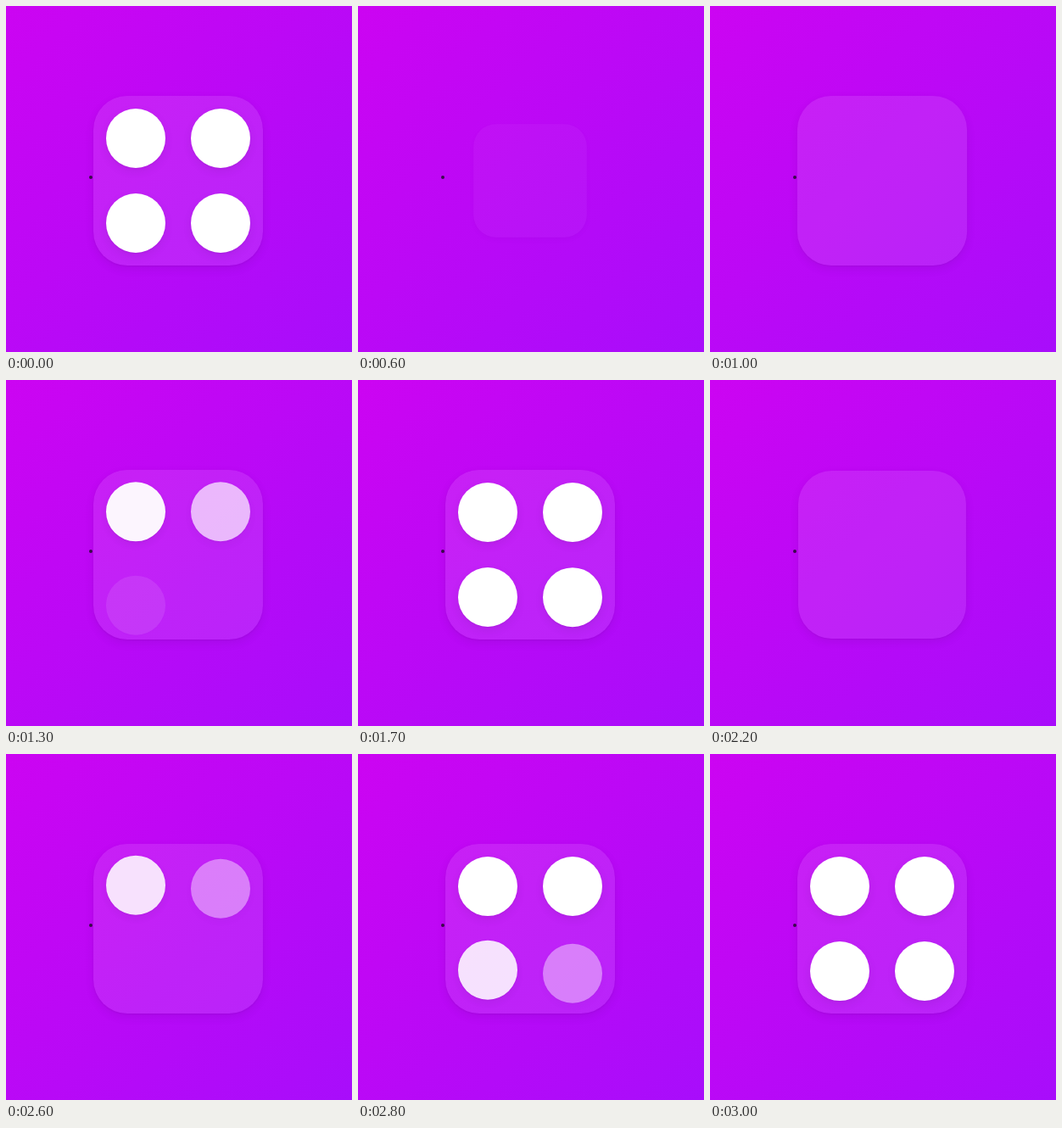
An HTML page for the animation above (3.1 s loop, 408x408 px).

```html
<!DOCTYPE html>
<html lang="en">
<head>
<meta charset="utf-8">
<title>Staggered dots</title>
<style>
  html, body { margin: 0; width: 100%; height: 100%; overflow: hidden; }
  body { position: relative; background: linear-gradient(135deg, #cc04f2, #a80dfb); }
  .marker, .panel, .dot { position: absolute; }
  .marker {
    left: 98px; top: 200px; width: 4px; height: 4px;
    border-radius: 50%; background: #3a0a4c;
  }
  .panel {
    left: 103px; top: 106px; width: 200px; height: 200px;
    border-radius: 40px; background: rgba(255, 255, 255, .1);
  }
  .dot { width: 70px; height: 70px; border-radius: 50%; background: #fff; }
  .panel, .dot {
    box-shadow: 0 1px 2px rgba(0, 0, 0, .05), 0 4px 12px rgba(0, 0, 0, .07);
  }
</style>
</head>
<body>
<div class="marker"></div>
<div class="panel"></div>
<script>
  const LOOP = 3100, STEP = 100;
  const STARTS = [-3000, 533, 1880];
  const DOT_DELAY = 535, STAGGER = 100;

  const panel = document.querySelector('.panel');
  const dots = Array.from({ length: 4 }, (_, i) => {
    const dot = document.createElement('div');
    dot.className = 'dot';
    dot.style.left = 15 + 100 * (i % 2) + 'px';
    dot.style.top = 15 + 100 * Math.floor(i / 2) + 'px';
    panel.append(dot);
    return dot;
  });

  // Remaining distance of a spring with stiffness 500 and damping 25.
  function spring(ms) {
    if (ms <= 0) return 1;
    const t = ms / 1000, decay = 12.5, freq = Math.sqrt(500 - decay * decay);
    return Math.exp(-decay * t) * (Math.cos(freq * t) + decay / freq * Math.sin(freq * t));
  }

  const bezier = (s, a, b) => 3 * (1 - s) ** 2 * s * a + 3 * (1 - s) * s * s * b + s ** 3;

  function fade(ms, duration) {
    const x = ms / duration;
    if (x <= 0) return 0;
    if (x >= 1) return 1;
    let low = 0, high = 1;
    for (let i = 0; i < 20; i++) {
      const mid = (low + high) / 2;
      if (bezier(mid, .25, .35) < x) low = mid; else high = mid;
    }
    return bezier(low, .1, 1);
  }

  function draw(now) {
    const time = Math.floor(now % LOOP / STEP) * STEP;
    const elapsed = time - Math.max(...STARTS.filter(start => start <= time));

    panel.style.transform = `scale(${1 - .8 * spring(elapsed)})`;
    panel.style.opacity = fade(elapsed, 250);
    dots.forEach((dot, i) => {
      const age = elapsed - DOT_DELAY - i * STAGGER;
      dot.style.transform = `translateY(${12 * spring(age)}px)`;
      dot.style.opacity = fade(age, 300);
    });
  }

  function tick() {
    draw(performance.now());
    requestAnimationFrame(tick);
  }
  tick();
</script>
</body>
</html>
```
